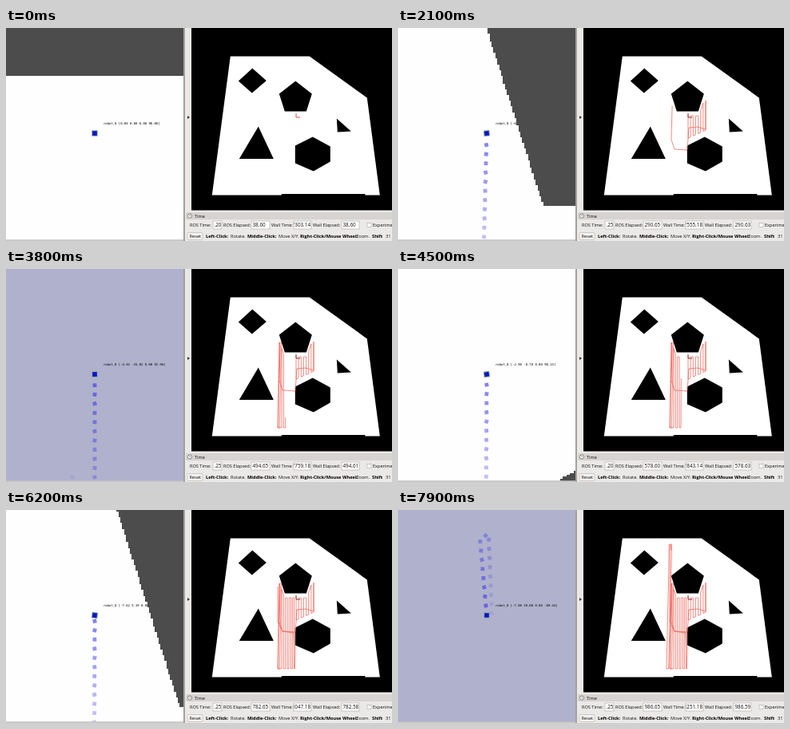
Recreate the animation shown at these times as an HTML page. Size 483 px wide and 267 px high, loop 8 s.

```html
<!DOCTYPE html>
<html lang="en">
<head>
<meta charset="utf-8">
<title>Robot coverage run</title>
<style>
html, body { margin: 0; width: 100%; height: 100%; overflow: hidden; background: #ebe9e7; }
#stage { display: block; width: 483px; height: 267px; }
text { font: 5.6px "Open Sans", "Noto Sans", sans-serif; fill: #111; white-space: pre; }
.help text { font-size: 5.7px; }
.help .bold { font-weight: 700; fill: #000; }
.value { font-size: 6.3px; }
#label { font: 3.92px "DejaVu Sans Mono", monospace; fill: #000; }
.box { fill: #fff; stroke: #aaa6a2; stroke-width: .6; }
#route { fill: none; stroke: #f05a4c; stroke-width: .7; stroke-linejoin: round; }
.solid { fill: #4c4c4c; fill-rule: evenodd; shape-rendering: crispEdges; }
</style>
</head>
<body>
<svg id="stage" viewBox="0 0 483 267">
  <defs><clipPath id="view"><rect width="222" height="265.5"/></clipPath></defs>
  <rect width="483" height="267" fill="#ebe9e7"/>

  <g clip-path="url(#view)">
    <rect width="222" height="266" fill="#fefefe"/>
    <g class="world" fill="#b0b1cc">
      <rect x="150" y="-50" width="400" height="119"/>
      <rect x="150" y="168.1" width="400" height="120"/>
    </g>
    <text id="label" x="122" y="120.6"></text>
    <g class="world"><path id="solids" class="solid"/></g>
    <g id="trail" fill="#3434e6"></g>
    <g id="robot">
      <rect x="-3.8" y="-3.8" width="7.6" height="7.6" fill="#8fae98"/>
      <rect x="-2.8" y="-2.8" width="5.6" height="5.6" fill="#0d14cf"/>
    </g>
  </g>
  <path d="M0 266H223" stroke="#aaa8a6" fill="none"/>
  <rect x="222" width="2" height="267" fill="#a3a19f"/>
  <path d="M227 110l3 2-3 2z" fill="#333"/>

  <rect x="232" width="251" height="228.5"/>
  <g transform="translate(-.2 -.6)">
    <path id="room" fill="#fff"/>
    <path id="blocks"/>
  </g>
  <path id="axis" d="M363 107V112H368" fill="none" stroke-width=".9"/>
  <path id="route"/>

  <rect x="225" y="231" width="258" height="9" fill="#d6d3d0"/>
  <circle cx="230" cy="235.5" r="2.6" fill="#fff" stroke="#555" stroke-width=".7"/>
  <path d="M230 234V235.7H231.4" fill="none" stroke="#444" stroke-width=".5"/>
  <text x="236" y="237.5">Time</text>

  <text x="230" y="249">ROS Time:</text>
  <text x="272" y="249">ROS Elapsed:</text>
  <text x="332" y="249">Wall Time:</text>
  <text x="384" y="249">Wall Elapsed:</text>
  <g id="fields"></g>
  <rect class="box" x="452" y="244.5" width="5" height="5"/>
  <text x="459" y="249">Experimental</text>

  <rect x="227" y="256.5" width="19" height="9" rx="1" fill="#f4f2f0" stroke="#b5b1ad" stroke-width=".6"/>
  <g class="help">
    <text x="229.5" y="263">Reset</text>
    <text class="bold" x="250" y="263">Left-Click:</text>
    <text x="281" y="263">Rotate.</text>
    <text class="bold" x="302" y="263">Middle-Click:</text>
    <text x="341" y="263">Move X/Y.</text>
    <text class="bold" x="368" y="263">Right-Click/Mouse Wheel:</text>
    <text x="438" y="263">Zoom.</text>
    <text class="bold" x="458" y="263">Shift</text>
    <text x="475" y="263">31 fps</text>
  </g>
</svg>

<script>
const $ = id => document.getElementById(id);
const STEP = 100, STEPS = 80, ZOOM = 12, CELL = 1 / 5, GAP = .96;
const EYE = { x: 111, y: 132 }, ORIGIN = { x: 363, y: 111 };

function add(parent, tag, attrs) {
  const node = document.createElementNS("http://www.w3.org/2000/svg", tag);
  for (const key in attrs) node.setAttribute(key, attrs[key]);
  return parent.appendChild(node);
}
const points = text => text.split(" ").map(p => p.split(",").map(Number));

// Map
const room = points("281,36 380,36 452,88 468,210 258,210");
const blocks = [
  "308.5,51 326,66.5 308,82 291,67",
  "362.5,67 383,83 376,105 349,105 342,83",
  "414,114 432,130 415,131",
  "316,124 335,164.5 292,164.5",
  "384,137 406,149 406,168 385,180 362,170 362,148",
  "345,208.5 449.5,208.5 449.5,211 345,211"
].map(points);
const outline = poly => "M" + poly.join("L") + "Z";

// Outline of a convex polygon snapped to the grid of the simulator
function stairs(poly) {
  const snap = v => Math.round(v / CELL) * CELL;
  const ys = poly.map(p => p[1]);
  const top = snap(Math.min(...ys)), rows = Math.round((Math.max(...ys) - top) / CELL);
  let right = "", left = "";
  for (let i = 0; i < rows; i++) {
    const y = top + i * CELL, mid = y + CELL / 2, xs = [];
    poly.forEach(([x1, y1], j) => {
      const [x2, y2] = poly[(j + 1) % poly.length];
      if ((y1 > mid) !== (y2 > mid)) xs.push(x1 + (x2 - x1) * (mid - y1) / (y2 - y1));
    });
    if (xs.length < 2) continue;
    const lo = snap(Math.min(...xs)), hi = snap(Math.max(...xs));
    right += (right ? "H" : `M${hi} ${y}H`) + `${hi}V${y + CELL}`;
    left = `H${lo}V${y}` + left;
  }
  return right + left + "Z";
}

$("room").setAttribute("d", outline(room));
$("blocks").setAttribute("d", blocks.map(outline).join(""));
$("solids").setAttribute("d", "M150 -50H550V290H150Z" + [room, ...blocks].map(stairs).join(""));

// Columns end below the pentagon and above the hexagon or the south wall
const ceiling = x => Math.max(91, 110 - 3 * Math.max(0, Math.abs(x - 362.5) - 14));
const ground = x => x < 362.5 ? 199 : 138 - .45 * (x - 363);

function sweep(x1, x2, count, up) {
  const way = [];
  for (let i = 0; i < count; i++) {
    const x = x1 + (x2 - x1) * i / (count - 1);
    const ends = [[x, ceiling(x)], [x, ground(x)]];
    way.push(...((i % 2 === 1) === up ? ends : ends.reverse()));
  }
  return way;
}

// Each leg reaches its last point at step `end`
const legs = [
  { end: 0, way: [[ORIGIN.x, ORIGIN.y]] },
  { end: 21, way: [[363, 109.5], ...sweep(363, 385, 8, false),
    ...points("385,127 375,124 364,125 362,153 346,152 342,140 343.1,97.4")] },
  { end: 30, way: points("342,92 340,199 342.3,199 344.5,92 342.5,92 341.2,153.8") },
  { end: 45, way: [[340.5, 199], ...sweep(345, 352, 4, true), [354, 199], [354.3, 137.1]] },
  { end: 55, way: [[354.3, 110], ...sweep(356.5, 360.5, 3, false),
    ...points("361.4,199 362.2,171.5 360.7,170.2")] },
  { end: 69, way: points("360,154 346,152 340,140 340.3,43 339.2,43 338.8,77.8") },
  { end: 79, way: points("336,199 338.5,199 342.5,50 342.2,42.5 341.3,43 342,51") }
];

const route = [];
let total = 0;
for (const leg of legs) {
  for (const [x, y] of leg.way) {
    const prev = route[route.length - 1];
    if (prev) total += Math.hypot(x - prev.x, y - prev.y);
    route.push({ x, y, at: total });
  }
  leg.dist = total;
}
$("route").setAttribute("d", "M" + route.map(p => `${p.x} ${p.y}`).join("L"));

function locate(dist) {
  let i = 1;
  while (i < route.length - 1 && route[i].at < dist) i++;
  const a = route[i - 1], b = route[i], f = (dist - a.at) / (b.at - a.at);
  const dx = b.x - a.x, dy = b.y - a.y;
  return { x: a.x + dx * f, y: a.y + dy * f, heading: Math.atan2(-dy, dx) * 180 / Math.PI };
}

// Panel values; the wall clock shows only the end of its number
function field(x, width, anchor = "start") {
  add($("fields"), "rect", { class: "box", x, y: 242, width, height: 10 });
  const inner = add($("fields"), "svg", { x: x + .5, y: 242, width: width - 1, height: 10, overflow: "hidden" });
  return add(inner, "text", { class: "value", x: anchor === "end" ? width - 1.5 : 1, y: 7.2, "text-anchor": anchor });
}
const rosTime = field(259, 11), rosElapsed = field(307, 23);
const wallTime = field(360, 22, "end"), wallElapsed = field(420, 22);

const trail = Array.from({ length: 18 }, (_, i) =>
  add($("trail"), "rect", { x: -2.4, y: -2.4, width: 4.8, height: 4.8, opacity: .6 - i * .03 }));

function draw(step) {
  const n = Math.max(1, legs.findIndex(leg => leg.end >= step));
  const from = legs[n - 1], to = legs[n];
  const dist = from.dist + (to.dist - from.dist) * (step - from.end) / (to.end - from.end);
  const bot = locate(dist);
  bot.heading += 10 * Math.sin(step);

  const toView = p => [EYE.x + (p.x - bot.x) * ZOOM, EYE.y + (p.y - bot.y) * ZOOM];
  const place = `translate(${toView({ x: 0, y: 0 })}) scale(${ZOOM})`;
  document.querySelectorAll(".world").forEach(g => g.setAttribute("transform", place));
  $("robot").setAttribute("transform", `translate(${EYE.x} ${EYE.y}) rotate(${-bot.heading})`);

  const last = Math.floor(dist / GAP - .4);
  trail.forEach((mark, i) => {
    const id = last - i, p = locate(Math.max(0, id * GAP));
    mark.setAttribute("visibility", id > 0 ? "visible" : "hidden");
    mark.setAttribute("transform",
      `translate(${toView(p)}) rotate(${-p.heading + 16 * Math.sin(id * 2.3)})`);
  });

  const pose = [(bot.x - ORIGIN.x) / 3, (ORIGIN.y - bot.y) / 3, 0, bot.heading];
  $("label").textContent = `robot_0 [${pose.map(v => v.toFixed(2)).join(" ")}]`;

  $("route").setAttribute("stroke-dasharray", `${dist} ${total + 10}`);
  $("route").setAttribute("visibility", step ? "visible" : "hidden");
  $("axis").setAttribute("stroke", step ? "#4a1512" : "#e03a30");

  const late = step % 9 % 6 !== 0, run = 12 * step;
  rosTime.textContent = late ? ".25" : ".20";
  rosElapsed.textContent = (38.6 + run + (late ? .05 : 0)).toFixed(2);
  wallTime.textContent = (7303.14 + run + (late ? .04 : 0)).toFixed(2);
  wallElapsed.textContent = (38.6 + run + .03 * Math.sin(step)).toFixed(2);
}

const start = performance.now();
let shown = -1;
function tick(now) {
  const step = Math.floor(Math.max(0, now - start) / STEP) % STEPS;
  if (step !== shown) draw(shown = step);
  requestAnimationFrame(tick);
}
draw(0);
requestAnimationFrame(tick);
</script>
</body>
</html>
```
